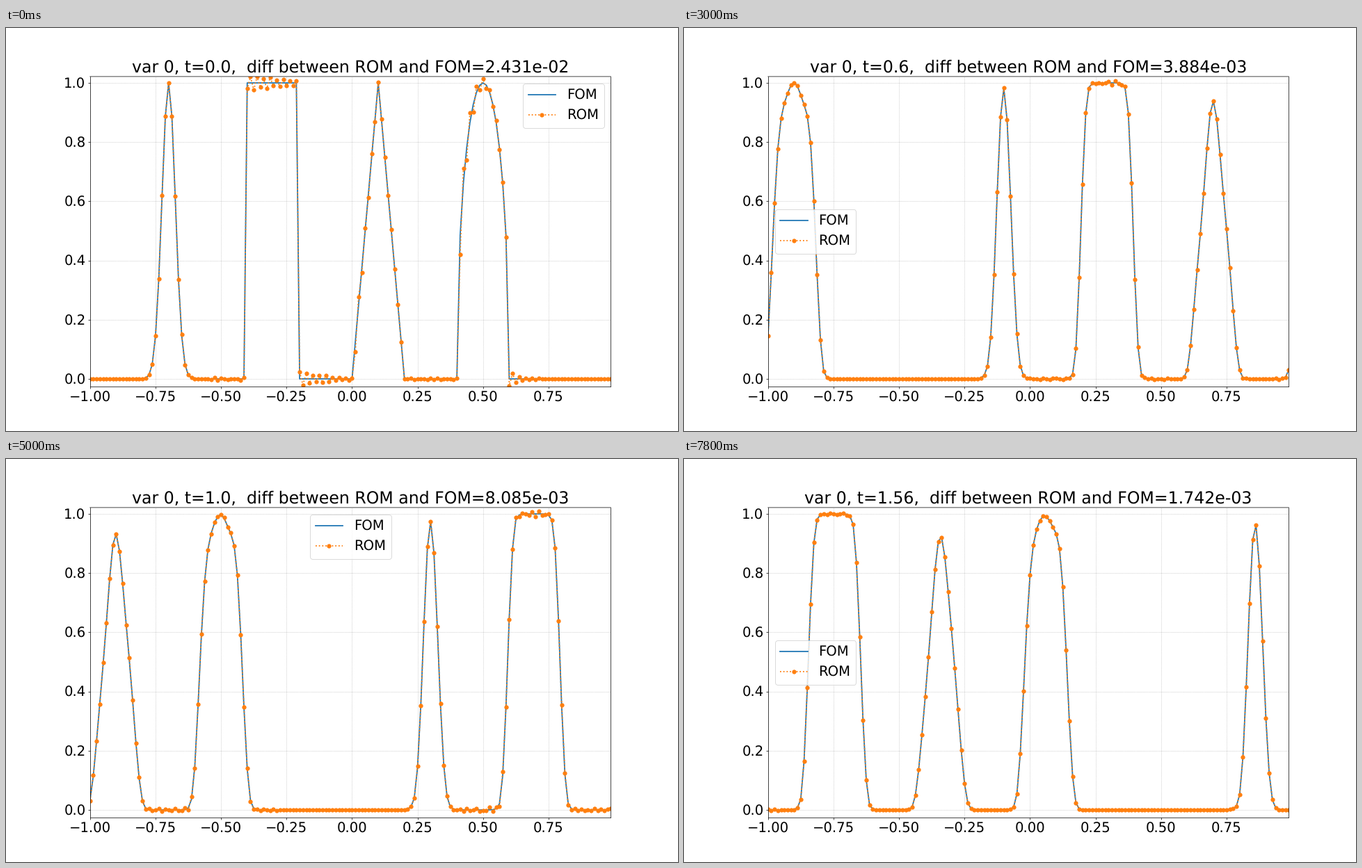
A matplotlib script that plays this animation: 966 by 580 pixels, repeating every 8000 ms.

```python
import math
import numpy as np
import matplotlib.pyplot as plt
from matplotlib.animation import FuncAnimation

W, H, DPI = 966, 580, 64
N, FRAMES, STEP, SUB = 160, 40, 0.04, 10
R = 5                      # cells per sub-stencil, scheme order 2R - 1
DX = 2 / N
FONT = 22.14

x = -1 + DX * np.arange(N)


def pulses():
    """Gaussian, box, triangle and half ellipse on a periodic line."""
    u = np.where(abs(x + 0.7) < 0.15, np.exp(-np.log(2) / 0.0009 * (x + 0.7) ** 2), 0)
    u[48:64] = 1
    u += np.maximum(1 - 10 * abs(x - 0.1), 0)
    u += np.sqrt(np.maximum(1 - 100 * (x - 0.5) ** 2, 0))
    return u


def fit(first, n):
    """Map n cell averages to the coefficients of their polynomial."""
    j = first + np.arange(n)[:, None]
    m = np.arange(1, n + 1)
    return np.linalg.inv(((j + 0.5) ** m - (j - 0.5) ** m) / m)


def roughness():
    """Matrix of summed squared derivatives over one cell."""
    g = np.zeros((R, R))
    for d in range(1, R):
        for m in range(d, R):
            for n in range(d, R):
                p = m + n - 2 * d
                if p % 2 == 0:
                    g[m, n] += math.perm(m, d) * math.perm(n, d) * 0.5 ** p / (p + 1)
    return g


def weno():
    """Edge values, roughness forms and ideal weights of the sub-stencils."""
    fits = [fit(-k, R) for k in range(R)]
    edge = np.array([0.5 ** np.arange(R) @ c for c in fits])
    rough = np.array([c.T @ roughness() @ c for c in fits])
    whole = 0.5 ** np.arange(2 * R - 1) @ fit(1 - R, 2 * R - 1)
    spread = np.zeros((2 * R - 1, R))
    for k in range(R):
        spread[R - 1 - k:2 * R - 1 - k, k] = edge[k]
    return edge, rough, np.linalg.lstsq(spread, whole, rcond=None)[0]


EDGE, ROUGH, IDEAL = weno()
CELLS = (np.arange(N) + np.arange(R)[:, None] - np.arange(R)[:, None, None]) % N


def slope(u):
    """Rate of change for unit speed to the right."""
    s = u[CELLS]
    beta = (s * (ROUGH @ s)).sum(axis=1)
    w = IDEAL[:, None] / (1e-6 + beta) ** 2
    flux = (w * (EDGE[:, :, None] * s).sum(axis=1)).sum(axis=0) / w.sum(axis=0)
    return (np.roll(flux, 1) - flux) / DX


def advance(u):
    dt = STEP / SUB
    for _ in range(SUB):
        a = slope(u)
        b = slope(u + dt / 2 * a)
        c = slope(u + dt / 2 * b)
        d = slope(u + dt * c)
        u = u + dt / 6 * (a + 2 * b + 2 * c + d)
    return u


# error level of the reduced model over time
ERR_T = [0, 0.2, 0.44, 0.72, 0.96, 1.0, 1.24, 1.56]
ERR = [2.431e-2, 8.494e-3, 4.711e-3, 3.360e-3, 4.2e-3, 8.085e-3, 2.690e-3, 1.742e-3]

# ripples behind the kinks: start, height, length in cells
KICKS = [(-0.4, -0.024, 9), (-0.2, 0.026, 9), (0.0125, -0.03, 3),
         (0.4125, -0.065, 4), (0.6, -0.026, 3)]


def ripple(k, u, err):
    """Grid-scale noise that travels with the pulses."""
    s = (x - STEP * k + 1) % 2 - 1
    env = np.interp(s, [-0.8, -0.7, -0.6, -0.42, -0.25, -0.15, 0.4, 0.85],
                    [0, 0.4, 0.6, 1, 1, 0.4, 0.4, 0])
    env = env + abs(np.roll(u, -1) - np.roll(u, 1)) * (env > 0)
    z = np.random.default_rng(40 + k).uniform(-1, 1, N)
    r = 0.006 * env * (z - (np.roll(z, 1) + np.roll(z, -1)) / 2)
    for start, height, length in KICKS:
        d = np.floor((s - start) / DX + 0.01)
        tail = (-1) ** d * np.exp(-np.maximum(d, 0) / length)
        r += math.exp(-STEP * k / 0.1) * height * np.where(d >= 0, tail, 0)
    return r * err * np.linalg.norm(u) / np.linalg.norm(r)


times = [round(STEP * k, 2) for k in range(FRAMES)]
errs = np.exp(np.interp(times, ERR_T, np.log(ERR)))
full = [pulses()]
for _ in range(FRAMES - 1):
    full.append(advance(full[-1]))
reduced = [u + ripple(k, u, errs[k]) for k, u in enumerate(full)]

plt.rcParams.update({"font.family": "DejaVu Sans", "font.size": FONT,
                     "text.hinting": "none"})
fig, ax = plt.subplots(figsize=(W / DPI, H / DPI), dpi=DPI)
fig.subplots_adjust(left=0.125, right=0.9, bottom=0.11, top=0.8795)
fom, = ax.plot(x, full[0], lw=2, label="FOM")
rom, = ax.plot(x, reduced[0], "o:", lw=2, ms=6, label="ROM")
ax.set_xlim(-1, 1 - DX)
ax.set_ylim(-0.0263, 1.0214)
ax.set_xticks(np.arange(-1, 0.8, 0.25))
ax.set_yticks(np.arange(0, 1.1, 0.2))
ax.grid(True, linestyle=":")
ax.spines["top"].set_snap(False)
ax.legend(loc="best")
title = ax.set_title("")


def draw(k):
    fom.set_ydata(full[k])
    rom.set_ydata(reduced[k])
    title.set_text(f"var 0, t={times[k]},  diff between ROM and FOM={errs[k]:.3e}")
    return fom, rom, title


anim = FuncAnimation(fig, draw, frames=FRAMES, interval=200, repeat=True, repeat_delay=0)
plt.show()
```
